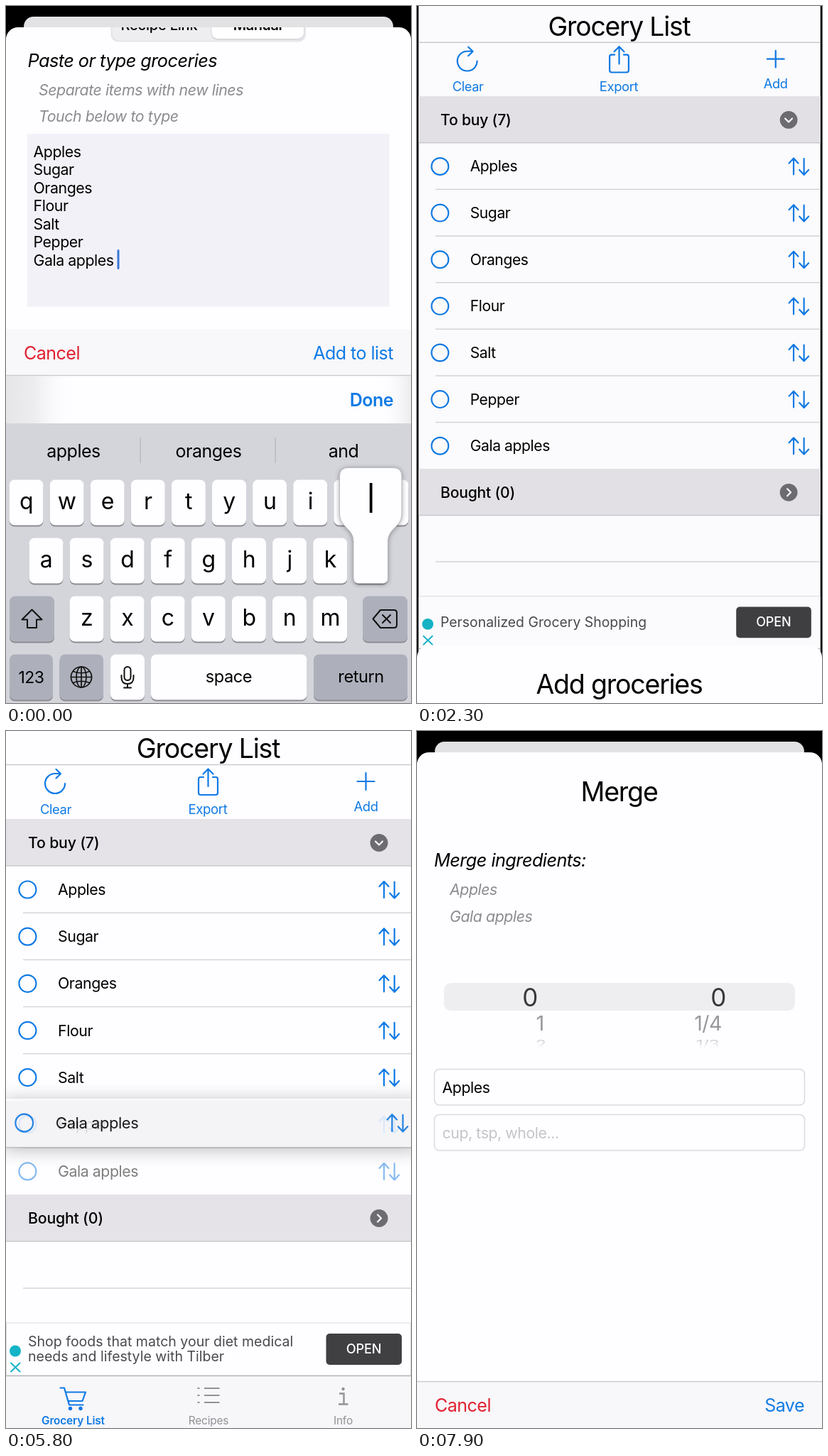
An HTML page for the animation above (8000 ms loop, 570 px wide and 982 px high).

```html
<!DOCTYPE html>
<html lang="en">
<head>
<meta charset="utf-8">
<title>Grocery list</title>
<style>
html, body { margin: 0; width: 100%; height: 100%; overflow: hidden; background: #000; }
svg { display: block; width: 100%; height: 100%; }
text {
  font-family: Inter, "Liberation Sans", sans-serif;
  font-optical-sizing: none;
  letter-spacing: -.02em;
  white-space: pre;
}
.title { font-size: 37.5px; letter-spacing: -.032em; text-anchor: middle; }
.head { font-size: 25.3px; letter-spacing: -.022em; font-style: italic; }
.hint { font-size: 21.3px; font-style: italic; fill: #8c8b90; }
.body { font-size: 21.3px; }
.bold { font-weight: 500; letter-spacing: -.01em; }
.act { font-size: 25px; }
.ad { font-size: 19.55px; letter-spacing: 0; fill: #4a494d; }
.tab { font-size: 15.4px; letter-spacing: -.01em; text-anchor: middle; }
.mid { text-anchor: middle; }
.end { text-anchor: end; }
.blue { fill: #0f7ae5; }
.red { fill: #e0202f; }
.ico { fill: none; stroke: #0f7ae5; stroke-width: 2.2; stroke-linecap: round; stroke-linejoin: round; }
.dark { fill: none; stroke: #111; stroke-width: 2; stroke-linecap: round; stroke-linejoin: round; }
.grey { fill: none; stroke: #929196; stroke-width: 2; }
#lift { filter: drop-shadow(0 3px 13px rgba(0,0,0,.32)); }
</style>
</head>
<body>
<svg id="stage" viewBox="0 0 570 982" xmlns="http://www.w3.org/2000/svg"></svg>
<script>
const LOOP = 8000, ROW = 66.15, FIRST = 223.5;
const HIDE_KEYS = 1722, DISMISS = 2049, PRESENT = 7150;
const items = ['Apples', 'Sugar', 'Oranges', 'Flour', 'Salt', 'Pepper', 'Gala apples'];

// Markup helpers
const text = (x, y, s, cls = 'body', attr = '') => `<text x="${x}" y="${y}" class="${cls}" ${attr}>${s}</text>`;
const rect = (x, y, w, h, fill, rx = 0, attr = '') =>
  `<rect x="${x}" y="${y}" width="${w}" height="${h}" fill="${fill}" rx="${rx}" ${attr}/>`;
const path = (d, cls = 'ico', attr = '') => `<path d="${d}" class="${cls}" ${attr}/>`;
const group = (id, inner, attr = '') => `<g id="${id}" ${attr}>${inner}</g>`;
const hline = (y, x = 0, color = '#c9c8cd') => rect(x, y - .7, 570 - x, 1.4, color);

// Grocery list screen
const rowParts = name =>
  '<circle cx="30.4" cy="0" r="12" class="ico"/>' + text(73, 7.6, name) +
  path('M532 11.5V-11M525.5 -4.5L532 -11.5L538.5 -4.5M546.7 -11V11.5M540.2 5L546.7 12L553.2 5');

const section = (y, label, chevron) =>
  rect(0, y, 570, 66, '#e5e3e8') + hline(y + 66) + text(31, y + 41, label, 'body bold') +
  `<circle cx="525" cy="${y + 33.5}" r="12.5" fill="#6d6c71"/>` +
  path(chevron, 'ico', `transform="translate(525 ${y + 33.5})" style="stroke:#fff"`);

function listScreen() {
  const rows = items.map((name, i) => {
    const y = FIRST + i * ROW;
    return `<g class="row" transform="translate(0 ${y})">${rowParts(name)}</g>` +
      (i < 6 ? hline(y + 32.7, 24, '#d4d3d8') : '');
  }).join('');
  return rect(0, -35, 570, 1100, '#fefdff', 15) +
    text(284.5, 38, 'Grocery List', 'title') + hline(47.5) +
    path('M83 74A14 14 0 1 1 69 60H76M70.5 54L77 60.2L70.5 66.5') +
    path('M278 65H273.5Q271 65 271 68V87Q271 90 274 90H295Q298 90 298 87V68Q298 65 295.5 65H291M284.5 78V54M277.5 60.5L284.5 53.5L291.5 60.5') +
    path('M494.5 71H518.5M506.5 59V83') +
    text(70, 117, 'Clear', 'mid blue', 'font-size="18.4"') +
    text(284, 117, 'Export', 'mid blue', 'font-size="18.6"') +
    text(506.5, 112.5, 'Add', 'mid blue', 'font-size="18.4"') +
    section(124, 'To buy (7)', 'M-5 -2L0 3L5 -2') +
    rect(0, 0, 570, ROW, '#cfced4', 0, 'id="target"') + rows +
    section(653, 'Bought (0)', 'M-2 -5L3 0L-2 5') + hline(785, 24, '#d4d3d8') +
    rect(.5, 834, 569, 74, '#fefdff', 0, 'stroke="#dddce1"') +
    '<circle cx="13" cy="873.5" r="8" fill="#14b4c6"/>' +
    path('M7 890.5L19.5 902.5M19.5 890.5L7 902.5', 'ico', 'style="stroke:#14b4c6;stroke-width:2"') +
    group('adA', text(31, 877.5, 'Personalized Grocery Shopping', 'ad')) +
    group('adB', text(31, 867, 'Shop foods that match your diet medical', 'ad') +
      text(31, 888, 'needs and lifestyle with Tilber', 'ad')) +
    rect(450.5, 849, 106.5, 44, '#403f42', 5) +
    text(503.5, 877, 'OPEN', 'mid bold', 'font-size="18.2" fill="#fff"') +
    tabBar();
}

function tabBar() {
  const dots = [926, 936, 946].map(y => `M269.5 ${y}H272.5M279 ${y}H300.5`).join('');
  return rect(0, 908, 570, 160, '#f7f6f9') + hline(908.5, 0, '#b6b5b9') +
    path('M76.5 925.5H82L89 949.5H108.5M84 931.5H112L107.5 944H87.5') +
    '<circle cx="90.5" cy="954.5" r="2.7" class="blue"/><circle cx="105" cy="954.5" r="2.7" class="blue"/>' +
    path(dots, 'grey') + path('M469 933.5H475.5V948M468 948.5H481.5', 'grey', 'style="stroke-width:2.4"') +
    '<circle cx="474.5" cy="927" r="2.2" fill="#929196"/>' +
    text(94.5, 977, 'Grocery List', 'tab blue', 'font-weight="600"') +
    text(285, 977, 'Recipes', 'tab', 'fill="#929196"') +
    text(474.5, 977, 'Info', 'tab', 'fill="#929196"');
}

// Sheets
const bar = (label, id) => rect(0, 0, 570, 110, '#f8f7fa') +
  text(25, 42.5, 'Cancel', 'act red') + text(545, 42.5, label, 'act blue end', `id="${id}"`);

function addSheet() {
  const lines = items.map((s, i) => text(38.5, 331 + i * 25.45, s)).join('');
  const spokes = items.concat('').map((_, i) =>
    `<path d="M0 -13V-22.5" class="spoke" transform="rotate(${i * 45})" stroke="#85848a" stroke-width="8" stroke-linecap="round"/>`).join('');
  return group('form',
    text(284.5, 98.5, 'Add groceries', 'title') +
    rect(147.5, 121, 274.5, 47.5, '#e6e5e9', 10) + rect(150, 123, 269, 43.5, '#eeedf0', 9) +
    rect(288.5, 124, 131, 42, '#d9d8dc', 9) + rect(289.5, 123.5, 129.5, 40.5, '#fff', 8.5) +
    text(215.5, 151.5, 'Recipe Link', 'mid bold', 'font-size="20"') +
    text(354, 151.5, 'Manual', 'mid', 'font-size="20" font-weight="600"') +
    text(30.5, 204, 'Paste or type groceries', 'head') +
    text(46, 243.5, 'Separate items with new lines', 'hint') +
    text(46, 281, 'Touch below to type', 'hint') +
    rect(30, 298, 509.5, 586, '#f3f1f8', 0, 'id="box"') + lines +
    rect(156.5, 461, 3, 28, '#3b77d6', 1.5, 'id="caret"')) +
    group('addBar', bar('Add to list', 'addBtn')) + group('spin', spokes);
}

function mergeSheet() {
  const pick = (x, y, s, size, color) => text(x, y, s, 'mid', `font-size="${size}" fill="${color}"`);
  const squash = (x, s) => `<g transform="translate(${x} 447) scale(1 .62)">${pick(0, 0, s, 25, '#a5a4a9')}</g>`;
  return text(284.5, 99, 'Merge', 'title') +
    text(24, 190.5, 'Merge ingredients:', 'head') +
    text(46, 230.5, 'Apples', 'hint') + text(46, 268.5, 'Gala apples', 'hint') +
    rect(38, 355, 494, 39, '#eeedf0', 10) +
    pick(159, 388, '0', 35, '#38373b') + pick(424, 388, '0', 35, '#38373b') +
    pick(173, 422, '1', 29, '#98979c') + pick(409.5, 422, '1/4', 28.5, '#98979c') +
    squash(174, '2') + squash(409, '1/3') + rect(38, 426, 494, 26, 'url(#fade)') +
    rect(24.5, 476.5, 521, 50.5, '#fefdff', 7, 'stroke="#dbdadf" stroke-width="1.5"') +
    rect(24.5, 540.5, 521, 50.5, '#fefdff', 7, 'stroke="#dbdadf" stroke-width="1.5"') +
    text(35.5, 509.5, 'Apples') + text(35.5, 573.5, 'cup, tsp, whole...', 'body', 'fill="#c5c4ca"') +
    `<g transform="translate(0 916.5)">${bar('Save', 'saveBtn')}</g>` + hline(916.5);
}

// Keyboard
const key = (x, y, w, fill = '#fefdff') => rect(x, y + 2, w, 64, '#8c8d93', 7.5) + rect(x, y, w, 64, fill, 7.5);
const letters = (s, x0, y) => [...s].map((c, i) => {
  const x = x0 + i * 57.1;
  return key(x, y, 48) + text(x + 24, y + 41, c, 'mid', 'font-size="32"');
}).join('');

function keyboard() {
  const gray = '#adb0bb', label = 'font-size="23.6"';
  const words = ['apples', 'oranges', 'and'].map((w, i) => text(95 + i * 190, 635.5, w, 'act mid')).join('');
  return rect(0, 520, 570, 68, '#fefdff') + rect(0, 520, 570, 68, 'url(#edge)', 0, 'id="shade"') +
    hline(520.5, 0, '#cccbd0') + rect(0, 588, 570, 470, '#d4d5db') +
    text(545, 563.5, 'Done', 'act blue end', 'font-weight="600"') + group('words', words) +
    rect(188.5, 608, 1.3, 36, '#b6b7bd') + rect(378.5, 608, 1.3, 36, '#b6b7bd') +
    letters('qwertyuiop', 4.5, 667.5) + letters('asdfghjkl', 32.5, 749.5) + letters('zxcvbnm', 89.5, 831.5) +
    key(5, 831.5, 63, gray) + key(502, 831.5, 63, gray) +
    path('M36.5 850.5L50.5 864.5H43V876H30V864.5H22.5Z', 'dark') +
    path('M527 851H546Q550 851 550 855V872Q550 876 546 876H527L516.5 863.5ZM530 858L541 869M541 858L530 869', 'dark') +
    key(5, 913.5, 61, gray) + key(75.5, 913.5, 61.5, gray) + key(147, 913.5, 48) +
    key(204, 913.5, 219.5) + key(433, 913.5, 132, gray) +
    text(35.5, 954, '123', 'mid', 'font-size="23"') +
    '<g class="dark" style="stroke-width:1.7"><circle cx="106" cy="945.5" r="14.5"/><ellipse cx="106" cy="945.5" rx="7" ry="14.5"/>' +
    '<path d="M106 931V960M91.5 945.5H120.5M94.5 937.5Q106 942 117.5 937.5M94.5 953.5Q106 949 117.5 953.5"/></g>' +
    '<rect x="166.5" y="931" width="9" height="19" rx="4.5" class="dark"/>' +
    path('M162.5 943V946Q162.5 955 171 955Q179.5 955 179.5 946V943M171 955V960M166 960.5H176', 'dark') +
    text(313.5, 953, 'space', 'mid', label) + text(499.5, 953, 'return', 'mid', label) +
    group('popup', path('M482 650.5H545Q557 650.5 557 662.5V716C557 734 537.5 736 537.5 754V806Q537.5 813.5 530 813.5H496.5Q489 813.5 489 806V754C489 736 469.5 734 469.5 716V662.5Q469.5 650.5 482 650.5Z',
      '', 'fill="#fefdff" stroke="#b9bac0" stroke-width="1" style="filter:drop-shadow(0 1px 3px rgba(0,0,0,.35))"') +
      text(513, 714, 'l', 'mid', 'font-size="57" font-weight="300"'));
}

document.getElementById('stage').innerHTML = `<defs>
  <clipPath id="sheetClip"><rect x="0" y="30" width="570" height="1100" rx="17"/></clipPath>
  <linearGradient id="fade" x1="0" y1="0" x2="0" y2="1">
    <stop offset="0" stop-color="#fefdff" stop-opacity="0"/><stop offset=".8" stop-color="#fefdff"/></linearGradient>
  <linearGradient id="edge">
    <stop offset="0" stop-color="#e6e6e8"/><stop offset=".07" stop-color="#ededef"/>
    <stop offset=".17" stop-color="#fefdff" stop-opacity="0"/><stop offset=".92" stop-color="#fefdff" stop-opacity="0"/>
    <stop offset="1" stop-color="#ececee"/></linearGradient></defs>` +
  rect(0, 0, 570, 982, '#000') +
  group('list', listScreen() + rect(0, -35, 570, 1100, '#000', 15, 'id="dim"')) +
  group('lift', rect(0, -33, 570, 66, '#fbfafc') + rowParts('Gala apples')) +
  group('sheet', `<g clip-path="url(#sheetClip)">${rect(0, 30, 570, 1100, '#fefdff')}` +
    group('add', addSheet()) + group('merge', mergeSheet()) + '</g>') +
  group('keys', keyboard());

const el = {};
document.querySelectorAll('[id]').forEach(e => el[e.id] = e);
const rows = document.querySelectorAll('.row');
const spokes = document.querySelectorAll('.spoke');

// Motion
const clamp = v => Math.max(0, Math.min(1, v));
const ramp = (t, a, b) => clamp((t - a) / (b - a));
const smooth = u => u * u * (3 - 2 * u);
const spring = ms => { const w = Math.max(0, ms) * .016; return 1 - (1 + w) * Math.exp(-w); };
const move = (e, x, y, s = 1) => e.setAttribute('transform', `translate(${x} ${y}) scale(${s})`);
const show = (e, v) => { e.style.opacity = +v; };

function along(points, t) {
  if (t <= points[0][0]) return points[0][1];
  for (let i = 1; i < points.length; i++) {
    const [a, from] = points[i - 1], [b, to] = points[i];
    if (t <= b) return from + (to - from) * (t - a) / (b - a);
  }
  return points[points.length - 1][1];
}

const dragY = [[5400, 620.5], [5600, 598], [5800, 552.5], [6200, 405], [6600, 261.5], [6850, 229], [7100, 223.5]];
const dragX = [[5400, 0], [5800, 3.5], [6200, -6], [6600, -13], [7100, -4]];

function draw(t) {
  const up = t < PRESENT ? 1 - spring(t - DISMISS) : spring(t - PRESENT);
  const s = 1 - .088 * up;
  move(el.list, 285 * (1 - s), 47 * up, s);
  show(el.dim, .11 * up);
  move(el.sheet, 0, 956 * (1 - up));
  show(el.sheet, up > .0005);
  show(el.add, t < 4000);
  show(el.merge, t >= 4000);

  // Typing form and keyboard
  const k = spring(t - HIDE_KEYS), typing = t < HIDE_KEYS;
  move(el.form, 0, -118 * (1 - k));
  el.box.setAttribute('height', typing ? 243.5 : 586);
  move(el.addBar, 0, typing ? 455.5 : 916 - 118 * (1 - k));
  show(el.addBtn, t < 1000 ? 1 : .3 + .7 * ramp(t, 1150, 1450));
  show(el.caret, t < 1000 ? 1 - ramp(t, 500, 700) : 0);
  move(el.spin, 283.5, typing ? 256 : 546 - 118 * (1 - k));
  show(el.spin, t >= 1000);
  const lead = (Math.floor(t / 100) + 4) % 8;
  spokes.forEach((e, i) => show(e, [.85, .68, .52, .4][(lead - i + 8) % 8] || .3));
  move(el.keys, 0, 462 * k);
  show(el.keys, k < .999);
  show(el.words, typing);
  show(el.shade, typing);
  show(el.popup, t < 100);

  const swap = ramp(t, 3000, 3300);
  show(el.adA, 1 - swap);
  show(el.adB, swap);

  // Dragging the last row onto the first
  const grab = smooth(ramp(t, 5050, 5350)), drop = smooth(ramp(t, 7100, 7280));
  const y = along(dragY, t), zoom = 1 + .032 * grab - .1 * drop;
  move(el.lift, 285 * (1 - zoom) + along(dragX, t), y, zoom);
  show(el.lift, t < 5050 ? 0 : .86 * (1 - drop));
  show(rows[6], 1 - .5 * grab);
  const over = Math.round((y - FIRST) / ROW);
  el.target.setAttribute('y', FIRST - 33 + over * ROW);
  show(el.target, t > 5400 && t < 7200 && over < 6);
}

const start = performance.now();
function tick() {
  draw((performance.now() - start) % LOOP);
  requestAnimationFrame(tick);
}
tick();
</script>
</body>
</html>
```
